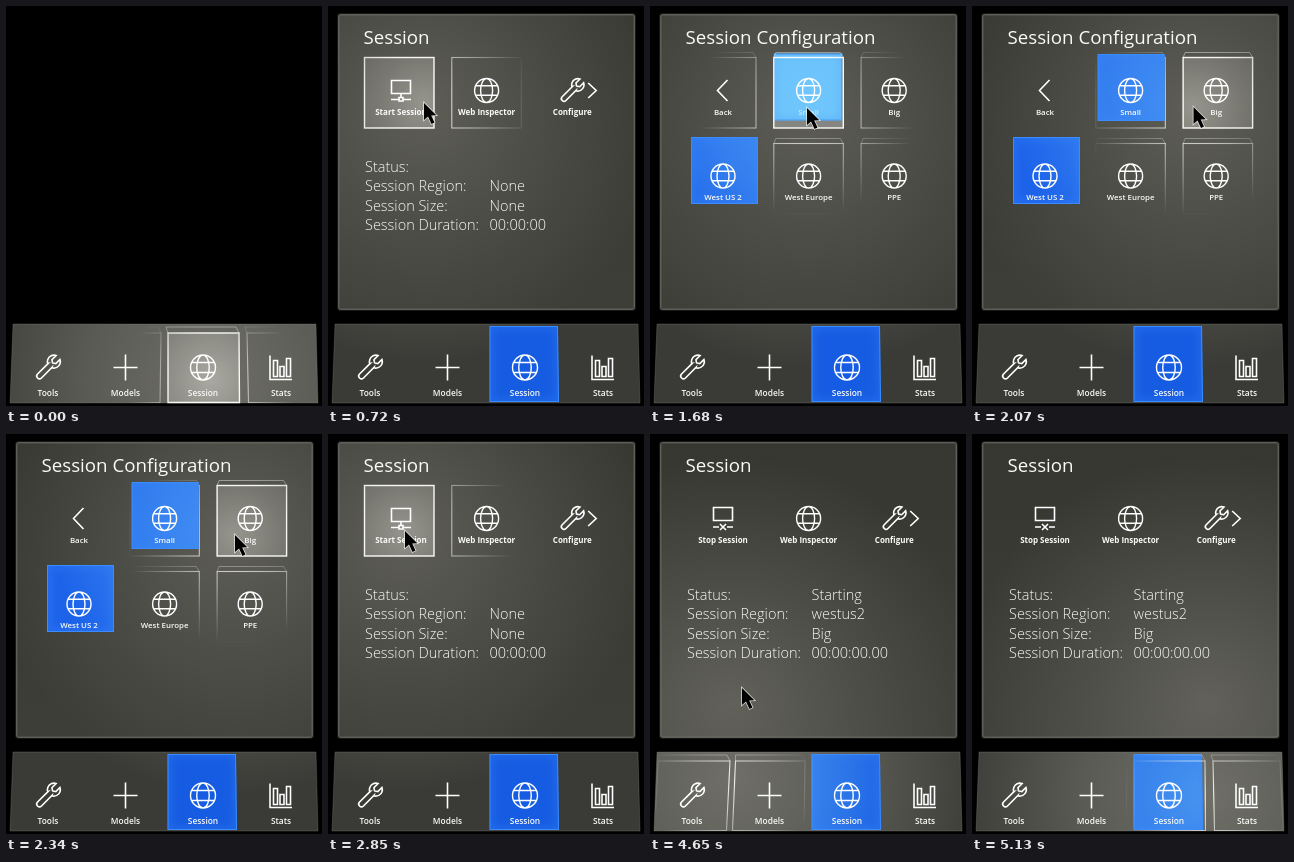
An HTML page with a canvas for the animation above (5.25 s loop, 316 by 400 pixels).

```html
<!DOCTYPE html>
<html lang="en">
<head>
<meta charset="utf-8">
<title>Session panel</title>
<style>
html, body { margin: 0; width: 100%; height: 100%; overflow: hidden; background: #000; }
canvas { display: block; width: 316px; height: 400px; }
</style>
</head>
<body>
<canvas id="stage"></canvas>
<script>
const LOOP = 5250, STEP = 30;
const canvas = document.getElementById('stage');
const ratio = window.devicePixelRatio || 1;
canvas.width = 316 * ratio;
canvas.height = 400 * ratio;
const ctx = canvas.getContext('2d');
const FONT = '"Open Sans", "Noto Sans", sans-serif';

// Pointer light: [time, x, y]
const PATH = [
  [0, 205, 374], [450, 205, 374], [690, 96, 97], [750, 96, 97],
  [960, 250, 95], [1170, 250, 95], [1470, 157, 102], [1830, 157, 102],
  [2130, 229, 101], [2460, 229, 101], [2670, 77, 97], [3120, 77, 97],
  [3300, 87, 256], [3301, 82, 345], [5040, 82, 345], [5130, 236, 360], [5250, 236, 360]
];

// Button presses: [start, end, button]
const PRESSES = [
  [180, 270, 'Session'], [990, 1080, 'Configure'], [1620, 1740, 'Small'],
  [2370, 2460, 'Big'], [2640, 2700, 'Back'], [3060, 3120, 'Start Session']
];

// Bar tabs: label, icon, centre, top left, top right, bottom left, bottom right
const TABS = [
  ['Tools', 'wrench', 42, 8, 80, 5, 76.5],
  ['Models', 'plus', 119.5, 85.5, 155, 82.5, 154],
  ['Session', 'globe', 197, 162, 233, 162, 233.5],
  ['Stats', 'chart', 275, 241, 308, 242.5, 311]
];

function pointAt(t) {
  const i = Math.max(1, PATH.findIndex(p => p[0] >= t));
  const [t0, x0, y0] = PATH[i - 1], [t1, x1, y1] = PATH[i];
  const k = Math.min(1, Math.max(0, (t - t0) / (t1 - t0)));
  const e = k * k * (3 - 2 * k);
  return { x: x0 + (x1 - x0) * e, y: y0 + (y1 - y0) * e };
}

function glow(p, radius, rgb, stops) {
  const g = ctx.createRadialGradient(p.x, p.y, 0, p.x, p.y, radius);
  stops.forEach((a, i) => g.addColorStop(i / (stops.length - 1), `rgba(${rgb},${a})`));
  return g;
}

function poly(points, close) {
  ctx.beginPath();
  points.forEach(([x, y]) => ctx.lineTo(x, y));
  if (close) ctx.closePath();
}

function box(x, y, w, h) {
  return [[x, y], [x + w, y], [x + w, y + h], [x, y + h]];
}

function text(str, x, y, size, weight = 400, align = 'left') {
  ctx.font = `${weight} ${size}px ${FONT}`;
  ctx.textAlign = align;
  ctx.fillStyle = '#fafaf8';
  ctx.fillText(str, x, y);
}

const ICONS = {
  globe(r) {
    ctx.arc(0, 0, r, 0, 7);
    ctx.moveTo(r * .5, 0);
    ctx.ellipse(0, 0, r * .5, r, 0, 0, 7);
    const w = r * .9, h = r * .4;
    ctx.moveTo(-w, -h); ctx.lineTo(w, -h);
    ctx.moveTo(-w, h); ctx.lineTo(w, h);
  },
  wrench(r) {
    ctx.rotate(Math.PI / 4);
    ctx.scale(r / 13, r / 13);
    ctx.moveTo(-3, -3);
    ctx.lineTo(-3, 13);
    ctx.arc(0, 13, 3, Math.PI, 0, true);
    ctx.lineTo(3, -3);
    ctx.arc(0, -9, 7, 1.107, -1.13, true);
    ctx.lineTo(3, -9); ctx.lineTo(0, -7); ctx.lineTo(-3, -9);
    ctx.arc(0, -9, 7, -2.01, 2.034, true);
    ctx.closePath();
  },
  plus(r) {
    ctx.moveTo(-r, 0); ctx.lineTo(r, 0);
    ctx.moveTo(0, -r - 1); ctx.lineTo(0, r + 1);
  },
  chart() {
    ctx.moveTo(-11, -12); ctx.lineTo(-11, 12); ctx.lineTo(11, 12);
    ctx.rect(-7.5, -7, 4, 16);
    ctx.rect(-1, -1, 4, 10);
    ctx.rect(5.5, -9, 4, 18);
  },
  back() {
    ctx.moveTo(4.5, -10.5); ctx.lineTo(-5.5, 0); ctx.lineTo(4.5, 10.5);
  },
  next() {
    ctx.moveTo(-4, -7.5); ctx.lineTo(4, 0); ctx.lineTo(-4, 7.5);
  },
  start() {
    ctx.rect(-9.5, -10, 19, 13);
    ctx.moveTo(0, 3); ctx.lineTo(0, 7);
    ctx.moveTo(-10, 9); ctx.lineTo(-2, 9);
    ctx.rect(-2, 7, 4, 3.5);
    ctx.moveTo(2, 9); ctx.lineTo(10, 9);
  },
  stop() {
    ctx.rect(-9.5, -11, 19, 13);
    ctx.moveTo(-10, 8.5); ctx.lineTo(-4, 8.5);
    ctx.moveTo(4, 8.5); ctx.lineTo(10, 8.5);
    ctx.moveTo(-3, 5.5); ctx.lineTo(3, 11.5);
    ctx.moveTo(3, 5.5); ctx.lineTo(-3, 11.5);
  }
};

function icon(name, x, y, r = 12) {
  ctx.save();
  ctx.translate(x, y);
  ctx.beginPath();
  ICONS[name](r);
  ctx.restore();
  ctx.strokeStyle = '#fff';
  ctx.lineWidth = name === 'globe' ? 1.4 : 1.6;
  ctx.stroke();
}

// Lit plate with a soft bright rim
function plate(corners, fill, rim, light, strength) {
  ctx.save();
  poly(corners, true);
  ctx.clip();
  ctx.fillStyle = fill;
  ctx.fill();
  ctx.fillStyle = glow(light, 180, '120,205,255', [strength, strength * .6, 0]);
  ctx.fill();
  ctx.shadowColor = ctx.strokeStyle = rim;
  ctx.shadowBlur = 9 * ratio;
  ctx.lineWidth = 2;
  ctx.stroke();
  ctx.restore();
}

function edgeLight(light, radius, hover) {
  ctx.strokeStyle = glow(light, radius, '255,255,250', hover ? [1, .95, .5] : [.95, .55, 0]);
  ctx.lineWidth = hover ? 1.4 : 1.1;
}

function strokeBack(points) {
  ctx.globalAlpha = .45;
  ctx.lineWidth = 1;
  poly(points);
  ctx.stroke();
  ctx.globalAlpha = 1;
}

function button(s, col, row, label, name, depth, selected) {
  const x = 36.5 + 87.3 * col, y = 51.5 + 86 * row, w = 69.5, h = 70.5;
  const cx = 73 + 85.6 * col, { light } = s;
  const hover = light.x > x && light.x < x + w && light.y > y && light.y < y + h;
  const pressed = s.pressed === label;
  if (hover && !selected) {
    ctx.fillStyle = glow(light, 95, '255,255,245', [.34, .2, .1]);
    ctx.fillRect(x, y, w, h);
  }
  if (pressed) {
    ctx.fillStyle = '#858581';
    ctx.fillRect(x, y, w, h);
    plate(box(x, y - 4, w - 1, 67), '#62bcfa', '#4a9df2', light, .6);
  }
  if (!(selected && row)) {
    edgeLight(light, 110, hover && !selected);
    ctx.strokeRect(x, y, w, h);
    if (depth) strokeBack([[x, y], [x + 2, y - 5], [x + w - 3, y - 5], [x + w, y]]);
  }
  if (selected && !pressed) {
    plate(box(cx - 33 + row, row ? 131 : 48, 67, 67), '#1c63ea', '#3a8cff', light, .45);
  }
  const iy = 84.5 + 85.5 * row;
  if (name === 'configure') {
    icon('wrench', cx, iy, 11.5);
    icon('next', cx + 20, iy);
  } else {
    icon(name, cx, iy);
  }
  ctx.globalAlpha = pressed ? .65 : 1;
  text(label, cx, 108.7 + 85.5 * row, depth ? 7.9 : 8, depth ? 600 : 700, 'center');
  ctx.globalAlpha = 1;
}

function panel(s) {
  ctx.beginPath();
  ctx.roundRect(10.5, 8.5, 296, 295, 2);
  const g = ctx.createLinearGradient(0, 8, 0, 304);
  g.addColorStop(0, '#373732');
  g.addColorStop(1, '#3e3e39');
  ctx.fillStyle = g;
  ctx.fill();
  const lamp = { x: s.light.x, y: Math.min(s.light.y, 270) };
  ctx.fillStyle = glow(lamp, 250, '255,255,240', [.19, .09, 0]);
  ctx.fill();
  ctx.strokeStyle = 'rgba(150,150,145,.16)';
  ctx.lineWidth = 3;
  ctx.stroke();
  ctx.strokeStyle = '#5e5e59';
  ctx.lineWidth = 1;
  ctx.stroke();
  if (s.page === 'config') configPage(s);
  else sessionPage(s);
}

function title(str) {
  text(str, 35.5, 38.3, 18.7);
}

function sessionPage(s) {
  title('Session');
  button(s, 0, 0, s.running ? 'Stop Session' : 'Start Session', s.running ? 'stop' : 'start', false, false);
  button(s, 1, 0, 'Web Inspector', 'globe', false, false);
  button(s, 2, 0, 'Configure', 'configure', false, false);
  const rows = [
    ['Status:', s.running ? 'Starting' : ''],
    ['Session Region:', s.running ? 'westus2' : 'None'],
    ['Session Size:', s.size],
    ['Session Duration:', s.running ? '00:00:00.00' : '00:00:00']
  ];
  rows.forEach(([key, value], i) => {
    const y = 165.5 + 19.5 * i;
    text(key, 37, y, 14.5, 300);
    text(value, 161.5, y, 14.5, 300);
  });
}

function configPage(s) {
  title('Session Configuration');
  button(s, 0, 0, 'Back', 'back', true, false);
  button(s, 1, 0, 'Small', 'globe', true, s.choice === 'Small');
  button(s, 2, 0, 'Big', 'globe', true, s.choice === 'Big');
  button(s, 0, 1, 'West US 2', 'globe', true, true);
  button(s, 1, 1, 'West Europe', 'globe', true, false);
  button(s, 2, 1, 'PPE', 'globe', true, false);
}

function bar(s) {
  const { light } = s;
  poly([[7, 318], [310, 318], [312, 397], [4, 397]], true);
  ctx.fillStyle = '#3a3a36';
  ctx.fill();
  ctx.fillStyle = glow(light, 260, '255,255,240', [.27, .16, 0]);
  ctx.fill();
  ctx.strokeStyle = 'rgba(140,140,135,.3)';
  ctx.lineWidth = 1;
  ctx.stroke();

  for (const [label, name, cx, tl, tr, bl, br] of TABS) {
    const selected = label === 'Session' && s.page;
    const hover = label === 'Session' && !s.page;
    const front = [[tl, 327], [tr, 327], [br, 396.5], [bl, 396.5]];
    if (hover) {
      poly(front, true);
      ctx.fillStyle = glow(light, 85, '255,255,245', [.4, .25, .1]);
      ctx.fill();
    }
    if (selected) {
      const face = [[161.5, 320], [230, 320], [231, 396], [161.5, 396]];
      if (label === s.pressed) plate(face, '#62bcfa', '#4a9df2', light, .6);
      else plate(face, '#165ce2', '#3a8cff', light, .5);
    }
    edgeLight(light, 86, hover);
    poly(front, true);
    ctx.stroke();
    const inset = cx < 160 ? 0 : -2;
    strokeBack([[tl, 327], [tl + inset, 321], [tr - 3, 321], [tr, 327]]);
    icon(name, cx, 361.5, name === 'globe' ? 12.5 : 12);
    text(label, cx, 390, 8.4, 600, 'center');
  }
}

function pointer(x, y) {
  const shape = [[0, 0], [0, 17], [4, 13.5], [7.5, 21], [10.5, 19.5], [7.2, 12.5], [12.3, 12.2]];
  poly(shape.map(([dx, dy]) => [x + dx, y + dy]), true);
  ctx.lineWidth = 1.6;
  ctx.strokeStyle = 'rgba(240,240,235,.85)';
  ctx.stroke();
  ctx.fillStyle = '#000';
  ctx.fill();
}

function stateAt(t) {
  const press = PRESSES.find(([a, b]) => t >= a && t < b);
  return {
    light: pointAt(t),
    pressed: press ? press[2] : '',
    page: t < 210 ? '' : t >= 1080 && t < 2700 ? 'config' : 'session',
    choice: t < 1740 ? '' : t < 2460 ? 'Small' : 'Big',
    running: t >= 3120,
    size: t >= 4140 ? 'Big' : 'None'
  };
}

function draw(now) {
  const t = Math.floor((now % LOOP) / STEP) * STEP;
  const s = stateAt(t);
  ctx.setTransform(ratio, 0, 0, ratio, 0, 0);
  ctx.fillStyle = '#000';
  ctx.fillRect(0, 0, 316, 400);
  if (s.page) panel(s);
  bar(s);
  if (t >= 450 && t < 3300) pointer(s.light.x, s.light.y);
  else if (t >= 3300 && t < 3870) pointer(87, 256);
  else if (t >= 4650 && t < 4710) pointer(92, 254);
}

const begin = performance.now();
function tick() {
  draw(performance.now() - begin);
  requestAnimationFrame(tick);
}
tick();
</script>
</body>
</html>
```
